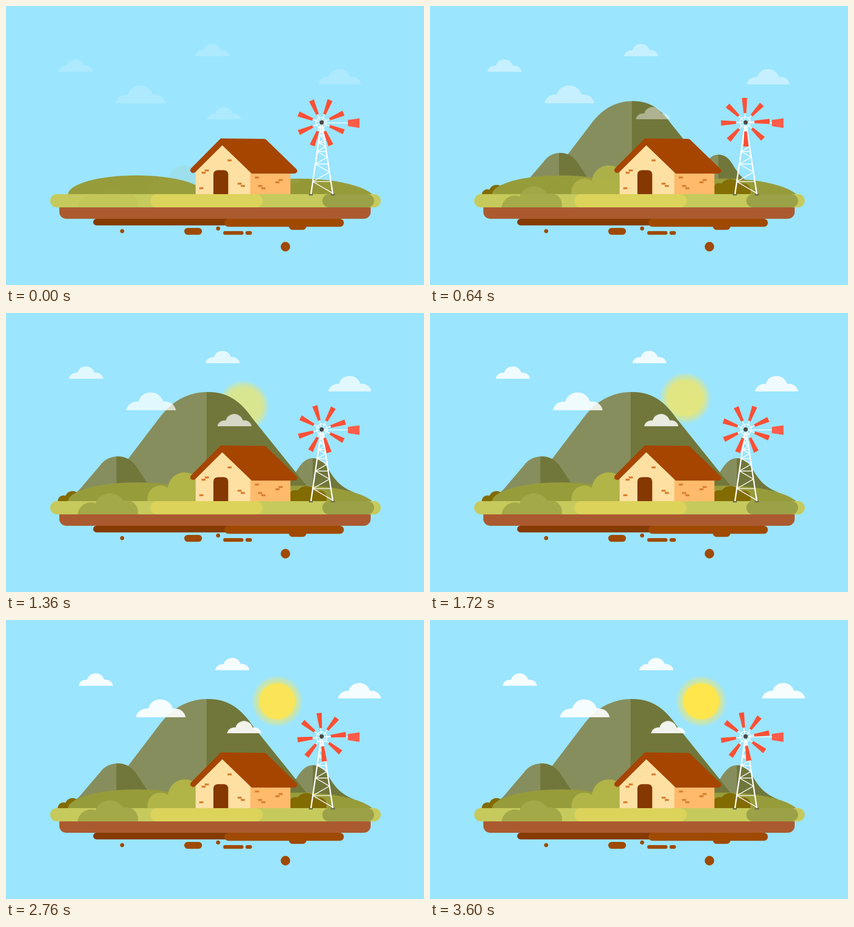
Recreate the animation shown at these times as an HTML page. Size 917 by 611 pixels, loop 3640 ms.

```html
<!DOCTYPE html>
<html lang="en">
<head>
<meta charset="utf-8">
<title>Farm island</title>
<style>
html, body { margin: 0; width: 100%; height: 100%; overflow: hidden; background: #9be5ff; }
svg { display: block; width: 100vw; height: 100vh; }
</style>
</head>
<body>
<svg viewBox="0 0 917 611" preserveAspectRatio="none">
  <defs>
    <radialGradient id="glow">
      <stop offset="0" stop-color="#ffe64d" stop-opacity=".62"/>
      <stop offset=".7" stop-color="#ffe64d" stop-opacity=".6"/>
      <stop offset=".86" stop-color="#ffe64d" stop-opacity=".35"/>
      <stop offset="1" stop-color="#ffe64d" stop-opacity="0"/>
    </radialGradient>
    <clipPath id="aboveGrass"><rect width="917" height="412.5"/></clipPath>
    <clipPath id="aboveSoil"><rect width="917" height="441"/></clipPath>
    <path id="cloud" d="M0 39C2 27 12 19 27 20C30 8 40 0 54 0C68 0 78 9 81 20C96 18 107 27 109 39Z"/>
  </defs>

  <rect width="917" height="611" fill="#9be5ff"/>

  <g id="sun">
    <circle id="halo" r="57" fill="url(#glow)"/>
    <circle id="core" r="39.5" fill="#ffe64d"/>
  </g>

  <g clip-path="url(#aboveGrass)">
    <g id="rightPeak">
      <path fill="#878e5d" d="M590 412L637 347C648 329 658 318 673 318H675V412Z"/>
      <path fill="#71773b" d="M673 412V318C690 318 700 328 710 346C722 366 735 381 762 392L785 412Z"/>
    </g>
    <g id="peak">
      <path fill="#878e5d" d="M195 415L340 225C370 187 407 173 442 173V415Z"/>
      <path fill="#71773b" d="M440 415V173H442C484 173 512 190 540 230L689 415Z"/>
    </g>
    <g id="leftPeak">
      <path fill="#878e5d" d="M130 412C150 397 160 389 170 376L206 334C216 320 230 314 246 314V412Z"/>
      <path fill="#71773b" d="M242 412V314H246C262 314 277 322 287 338L308 370L335 412Z"/>
    </g>
    <g id="shrub" fill="#826b00">
      <circle cx="146" cy="407" r="17"/><circle cx="126" cy="412" r="12.5"/>
    </g>
    <g fill="#979c3b">
      <ellipse cx="286" cy="413" rx="150" ry="42"/>
      <ellipse cx="645" cy="428" rx="167" ry="50"/>
    </g>
    <g class="bush" fill="#b1b447">
      <circle cx="392" cy="386" r="37"/><circle cx="339" cy="407" r="29"/>
      <rect x="339" y="395" width="78" height="18"/>
    </g>
    <g class="bush" fill="#826b00">
      <circle cx="659" cy="403" r="24"/><circle cx="635" cy="406" r="18"/>
      <circle cx="688" cy="404" r="15.5"/><rect x="635" y="400" width="68" height="13"/>
    </g>
  </g>

  <g id="clouds" fill="#fff"></g>

  <g stroke="#9f4a00" stroke-linecap="round">
    <path stroke="#853a00" stroke-width="14.500" d="M198.500 473.200H485"/>
    <path stroke-width="17.500" d="M488 474.800H732.500"/>
    <path stroke-width="16" d="M628.500 482.300H651"/>
    <path stroke-width="15" d="M398.500 493.500H422.500"/>
    <path stroke-width="8" d="M480.500 497H517M529.500 497H535.500"/>
    <path stroke-width="9" d="M254.800 493h.01M465.300 487.200h.01"/>
    <path stroke-width="20.800" d="M613 527h.01"/>
  </g>
  <rect x="117" y="425" width="683" height="41" rx="15" fill="#ab5a30"/>
  <rect x="97" y="412" width="725" height="29" rx="14.5" fill="#c6ca5c"/>
  <g class="bush" fill="#a3a848" clip-path="url(#aboveSoil)">
    <circle cx="228" cy="429" r="34"/><circle cx="186" cy="444" r="29"/>
    <circle cx="265" cy="435" r="24.5"/><rect x="180" y="425" width="100" height="16"/>
  </g>
  <rect x="317" y="412" width="246" height="29" rx="14.5" fill="#dcd35b"/>
  <rect x="694" y="412" width="113.5" height="29" rx="14.5" fill="#9ba147"/>

  <path fill="#ffe0a3" d="M416 412V360L474 300L537 364V412Z"/>
  <path fill="#ffba6c" d="M536 362H624V412H536Z"/>
  <path fill="#853800" d="M455 412V370Q455 359.500 466 359.500H477Q487.500 359.500 487.500 370V412Z"/>
  <path id="bricks" fill="#d9802f"/>
  <path fill="#a64500" d="M472.500 290L566 291Q569 291 571 293L637 357Q641 362 637 365Q635 367 632 367H539L474.500 305L415 364Q411 367.500 406 364Q402.500 360 406 355.500L469 292Q470.500 290 472.500 290Z"/>

  <path stroke="#6b7048" stroke-width="4" d="M664.500 413h8.500M713 413h8.500"/>
  <g fill="none" stroke="#fff">
    <path id="braces" stroke-width="1.700"/>
    <path stroke-width="3" d="M691 262L669 412M694 262L717 412"/>
    <path stroke-width="1.600" d="M692 256H751"/>
  </g>
  <path fill="#ff5c4a" d="M750 249.500L775.500 246V267L750 263Z"/>
  <g id="rotor">
    <circle r="11.500" fill="none" stroke="#fff" stroke-width="1.600"/>
  </g>
  <circle cx="692.500" cy="255" r="4.800" fill="#4d4848"/>
</svg>
<script>
const LOOP = 3640, STEP = 40, MID = 459, GROUND = 412;
const $ = id => document.getElementById(id);
const set = (id, k, v) => $(id).setAttribute(k, v);
const clamp = v => Math.min(1, Math.max(0, v));
const ramp = (t, from, to) => clamp((t - from) / (to - from));
const easeOut = u => 1 - (1 - u) ** 3;

function add(parent, tag, attrs) {
  const el = document.createElementNS("http://www.w3.org/2000/svg", tag);
  for (const k in attrs) el.setAttribute(k, attrs[k]);
  $(parent).appendChild(el);
}

function cloud(x, y, scale = 0.69) {
  add("clouds", "use", { href: "#cloud", transform: `translate(${x} ${y}) scale(${scale})` });
}
cloud(115.5, 117);
cloud(415, 83);
cloud(441, 221.5);
cloud(241, 174, 1);
cloud(684.5, 138, 0.865);

// Every second brick has a neighbour one course below, left and right in turn
const brick = (x, y) => `M${x} ${y}h9v4.3h-9z`;
set("bricks", "d", [[436, 358], [486, 336], [508, 387], [424, 397], [598, 379], [546, 373.5], [553, 392]]
  .map(([x, y], i) => brick(x, y) + (i % 2 ? "" : brick(x + (i % 4 ? 7 : -7), y + 5)))
  .join(""));

// Tower lattice: rungs close up towards the top, joined by a zigzag
const legL = y => 691 - (y - 262) * 22 / 150;
const legR = y => 694 + (y - 262) * 23 / 150;
const rung = k => 250 + 134.5 * 0.845 ** k;
const brace = (a, b) => `M${legL(a)} ${a}L${legR(b)} ${b}`;
let lattice = brace(rung(0), 410);
for (let k = 0; k < 11; k++) {
  const a = rung(k), b = rung(k + 1);
  lattice += k % 2 ? brace(b, a) : brace(a, b) + brace(a, a);
}
set("braces", "d", lattice);

for (let i = 0; i < 8; i++) {
  const transform = `rotate(${i * 45})`;
  add("rotor", "path", { d: "M4 0H21", stroke: "#fff", "stroke-width": 1.6, transform });
  add("rotor", "path", { d: "M20 -2.9L53.3 -5.8V5.8L20 2.9Z", fill: "#ff5035", transform });
}

// Grow from the ground at x, moved sideways by shift
function rise(id, x, s, shift = 0) {
  set(id, "transform", `translate(${x + shift} ${GROUND}) scale(${s}) translate(${-x} ${-GROUND})`);
}

function draw(t) {
  set("clouds", "transform", `translate(${44 * ramp(t, 20, 2620)} 0)`);
  set("clouds", "opacity", Math.min(0.91, 0.19 + t * 0.000385));

  rise("peak", MID, easeOut(ramp(t, -43, 1405)));
  const grow = easeOut(ramp(t, -12, 1133));
  const away = 1 - easeOut(ramp(t, -12, 1519));
  rise("leftPeak", 242, grow, (MID - 242) * away);
  rise("rightPeak", 673, grow, (MID - 673) * away);
  set("shrub", "transform", `translate(0 ${22 * (1 - grow)})`);

  const fade = clamp(0.1 + t / 800);
  document.querySelectorAll(".bush").forEach(b => b.setAttribute("opacity", fade));

  const left = 1 - ramp(t, 960, 2040);
  set("sun", "transform", `translate(${595 - 118 * left} ${178 + 52 * left ** 1.5})`);
  set("halo", "opacity", ramp(t, 840, 1340));
  set("core", "opacity", ramp(t, 1300, 3000));

  // The wheel sits slightly off its axle
  set("rotor", "transform",
    `translate(692.5 255.4) rotate(${21.5 + t * 0.1041}) translate(-.9 .8)`);
}

let start;
function tick(now) {
  start ??= now;
  draw(Math.floor((now - start) % LOOP / STEP) * STEP);
  requestAnimationFrame(tick);
}
draw(0);
requestAnimationFrame(tick);
</script>
</body>
</html>
```
